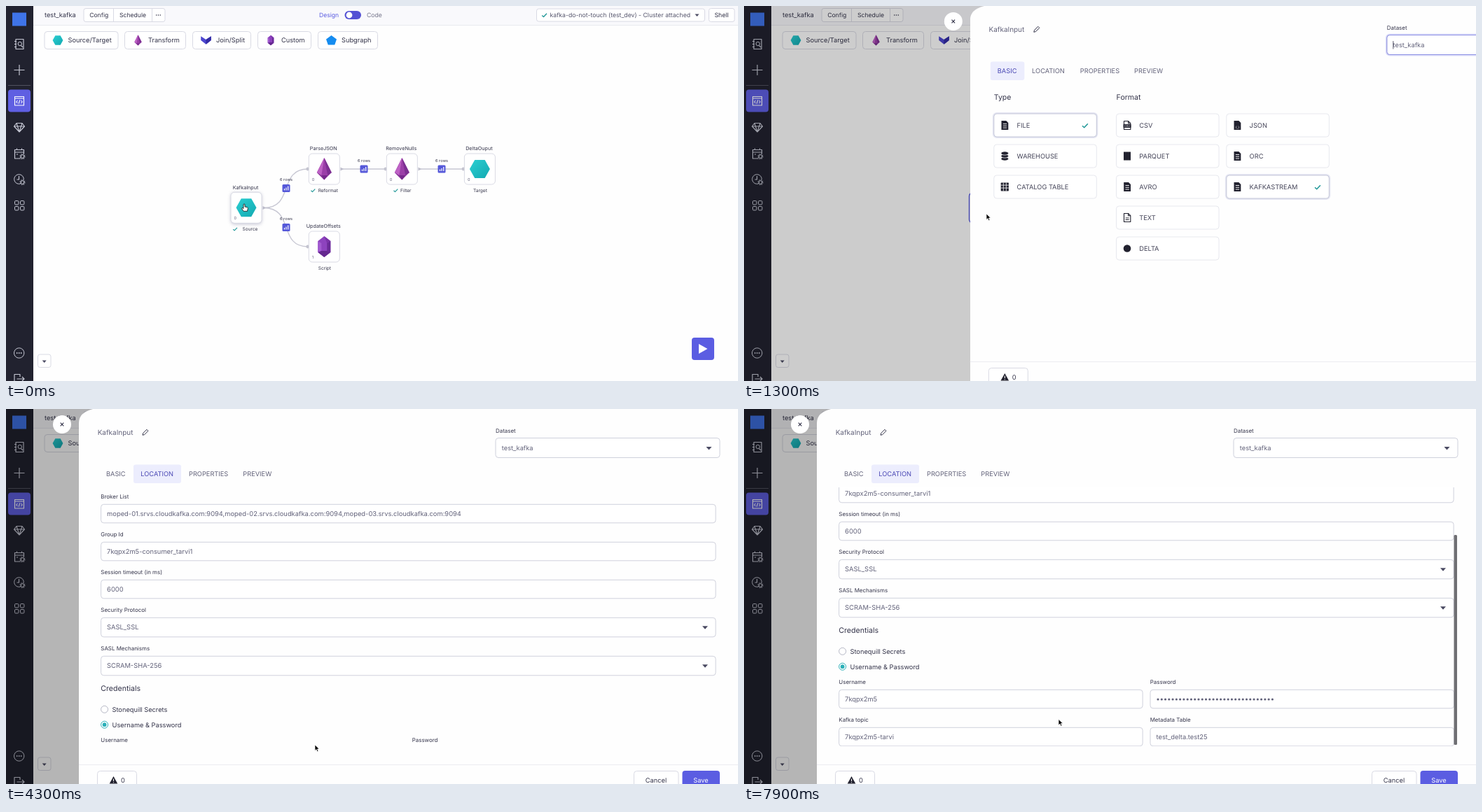
These frames come from a looping animation (1045 by 536 pixels, 8 s). An HTML page:

```html
<!DOCTYPE html>
<html lang="en">
<head>
<meta charset="utf-8">
<title>Pipeline editor</title>
<style>
  html, body { margin: 0; width: 100%; height: 100%; overflow: hidden; background: #fefefe; }
  svg { display: block; width: 100vw; height: 100vh; }
  text { font-family: Inter, "Open Sans", sans-serif; text-rendering: geometricPrecision; white-space: pre; }
</style>
</head>
<body>
<svg id="stage" viewBox="0 0 1045 536" preserveAspectRatio="none"></svg>
<script>
const INK = '#34344a', MUTED = '#62627a', LINE = '#d9dae4', ACCENT = '#5b5de2', TEAL = '#269a9a';

// Shape helpers; text is placed by its vertical centre.
const text = (x, y, s, size = 9.25, fill = INK, extra = '') =>
  `<text x="${x}" y="${y + size * 0.364}" font-size="${size}" fill="${fill}" ${extra}>${s.replace(/&/g, '&amp;')}</text>`;
const mid = (x, y, s, size, fill) => text(x, y, s, size, fill, 'text-anchor="middle"');
const box = (x, y, w, h, r = 4, fill = '#fff', stroke = LINE, extra = '') =>
  `<rect x="${x}" y="${y}" width="${w}" height="${h}" rx="${r}" fill="${fill}" stroke="${stroke}" ${extra}/>`;
const path = (d, stroke = INK, width = 1, fill = 'none') =>
  `<path d="${d}" stroke="${stroke}" stroke-width="${width}" fill="${fill}" stroke-linejoin="round"/>`;
const shape = (d, fill) => `<path d="${d}" fill="${fill}"/>`;
const dot = (x, y, r, fill, stroke = 'none') =>
  `<circle cx="${x}" cy="${y}" r="${r}" fill="${fill}" stroke="${stroke}"/>`;
const at = (x, y, body, scale = 1) => `<g transform="translate(${x} ${y}) scale(${scale})">${body}</g>`;
const group = (id, body) => `<g id="${id}">${body}</g>`;
const dots = (x, y, gap, fill, r = 0.9) => [-gap, 0, gap].map(d => dot(x + d, y, r, fill)).join('');
const check = (x, y, scale = 1) => at(x, y, path('M-3.3 .2L-1 2.4 3.5 -2.4', TEAL, 1.4), scale);
const caretDown = (x, y, s = 4) => shape(`M${x - s} ${y - s / 2}h${2 * s}l${-s} ${s * 1.15}z`, '#4a4a62');

// Component icons, drawn at node size around the origin.
const hexagon = shape('M-14.5 0L-7.2 -13H7.2L14.5 0 7.2 13H-7.2Z', 'url(#teal)');
const drop = shape('M0 -16L10.5 5 0 15.5 -10.5 5Z', '#9b3fa8')
  + shape('M0 -16L-10.5 5 -4 9Z', '#bd62c4') + shape('M0 -16L10.5 5 5 9Z', '#7c3092')
  + shape('M-10.5 5L-4 9 0 15.5Z', '#8b3a9c') + shape('M-4 9H5L0 15.5Z', '#74298a');
const crystal = shape('M0 -15L9 -8V8L0 15 -9 8V-8Z', '#8d43be')
  + shape('M0 -15L9 -8 4 -5Z', '#7a33a8') + shape('M9 -8V8L4 6V-5Z', '#6a2b98')
  + shape('M-9 -8L-4 -5V6L-9 8Z', '#a25bd0') + shape('M-9 8L-4 6H4L9 8 0 15Z', '#65288f');
const chevron = shape('M-14 -11L0 -2 14 -11V0L0 11 -14 0Z', '#4c46cf') + shape('M0 -2L14 -11V0L0 11Z', '#322ba4');
const pentagon = shape('M0 -14L15 -3 9.5 13H-9.5L-15 -3Z', '#158cf0');

// Sidebar
const PALE = '#c6c8d4';
const thin = d => path(d, PALE, 1.15);
const gear = (x, y) => dot(x, y, 3.9, '#21222f') + dot(x, y, 2.3, 'none', PALE)
  + `<circle cx="${x}" cy="${y}" r="3.4" fill="none" stroke="${PALE}" stroke-width="1.2" stroke-dasharray="1.3 1.37"/>`;
const sidebar = box(0, 0, 39, 536, 0, '#21222f', 'none')
  + box(9, 9.5, 20, 19, 0, '#3f74e8', 'none')
  + thin('M14 47.5H25V61.5H14ZM12 50.5H15M12 54.5H15M12 58.5H15M21.5 56.5L24 59') + dot(19.8, 54, 2.7, 'none', PALE)
  + thin('M11.5 91.5H26.5M19 84V99')
  + path('M3 113.5H35', '#50515f')
  + box(3, 119.5, 32, 32, 4, '#5f5fe2', 'none')
  + path('M12.5 129.5H25.5V142H12.5ZM12.5 132H25.5M16.5 135L14.7 137 16.5 139M21.5 135L23.3 137 21.5 139M19.8 134.3L18.2 139.7', '#fff', 1.1)
  + thin('M15 167.5H23L26.5 172 19 180 11.5 172ZM11.5 172H26.5M15 167.5L19 180 23 167.5')
  + thin('M12.5 205.5H25.5V218H12.5ZM12.5 209H25.5M15.5 203.5V206M22.5 203.5V206M15 212H17') + gear(23.5, 215)
  + dot(18.5, 247.5, 6.8, 'none', PALE) + thin('M18.5 243V248H15.5') + gear(23.5, 252)
  + [[12.5, 278.5], [20.5, 278.5], [12.5, 286.5], [20.5, 286.5]].map(([x, y]) => box(x, y, 5.4, 5.4, 1.2, 'none', PALE)).join('')
  + dot(18.7, 496, 7.2, 'none', PALE) + dots(18.7, 496, 3, PALE)
  + thin('M20 530V526.5H12V540H20V536M15.5 533H26M23 530L26 533 23 536');

// Header and component palette
const header = box(39, 0, 1006, 27, 0, '#f9f9fc', 'none') + path('M39 27.5H1045', '#e9eaf0')
  + text(55, 13, 'test_kafka')
  + box(111, 3.5, 116, 19, 3) + path('M153.5 3.5V22.5M208.5 3.5V22.5', LINE)
  + mid(132.7, 13, 'Config', 8.65) + mid(181, 13, 'Schedule', 8.65) + dots(217.5, 13, 2.8, INK, 0.8)
  + text(447, 13, 'Design', 8.6, ACCENT) + box(483.5, 7, 23.5, 12, 6, '#5451d4', 'none') + dot(490, 13, 4.4, '#fff')
  + text(515, 13, 'Code', 8.7, '#77778c')
  + box(757.5, 4, 240, 18, 3) + check(768.5, 13.2) + text(776.5, 13, 'kafka-do-not-touch (test_dev) - Cluster attached', 8.69, '#55556c')
  + caretDown(986.5, 13, 3)
  + box(1003.5, 3.5, 36.5, 19, 3) + mid(1021.5, 13, 'Shell', 8.8);
const palette = [
  ['Source/Target', 55, 105, 74, 88.5, hexagon, 0.51], ['Transform', 169.5, 87, 188.5, 203, drop, 0.49],
  ['Join/Split', 266.5, 83, 285.5, 300, chevron, 0.52], ['Custom', 359.5, 76, 378, 393, crystal, 0.48],
  ['Subgraph', 445.5, 85, 464.5, 479, pentagon, 0.5]
].map(([name, x, w, iconX, textX, icon, k]) =>
  box(x, 36.5, w, 25, 4) + at(iconX, 49, icon, k) + text(textX, 49, name)).join('');

// Graph
const node = (x, y, name, kind, icon, count, ticked) =>
  box(x - 22, y - 22, 44, 44, 5) + at(x, y, icon) + mid(x - 1, y - 29.3, name, 7.2)
  + text(x - 17.5, y + 15, count, 5.6, MUTED)
  + mid(x + (ticked ? 5.5 : 0.5), y + 30.7, kind, 6.55)
  + (ticked ? check(x - (kind === 'Filter' ? -2 : 0) - (kind === 'Filter' ? 11 : 16), y + 30.6, 0.85) : '');
const badge = (x, y) => mid(x, y - 12.3, '6 rows', 5.6)
  + box(x - 5.5, y - 5.5, 11, 11, 1.5, '#5558d9', 'none')
  + path(`M${x - 2.5} ${y + 3}v-2.5M${x} ${y + 3}v-4M${x + 2.7} ${y + 3}v-6`, '#fff', 1.2);
const port = (x, y) => dot(x, y, 2.4, '#c3c3cf');
const outlet = (x, y) => shape(`M${x - 2} ${y - 2.6}l4.5 2.6 -4.5 2.6z`, '#bcbcca');
const graph = path('M368 288.5C412 288.5 388 233 431 233M368 288.5C412 288.5 388 344 431 344M479 233H542M590 233H653', '#c6c6d2', 1.3)
  + [[430.8, 233], [430.8, 344], [542, 233], [653, 233]].map(p => port(...p)).join('')
  + [[368.5, 288.5], [479.5, 233], [590.5, 233]].map(p => outlet(...p)).join('')
  + [[400, 260.5], [400, 316.5], [511, 233], [622, 233]].map(p => badge(...p)).join('')
  + node(454.3, 233, 'ParseJSON', 'Reformat', drop, '0', true)
  + node(565.3, 233, 'RemoveNulls', 'Filter', drop, '0', true)
  + node(676.4, 233, 'DeltaOuput', 'Target', hexagon, '0')
  + node(454.3, 344, 'UpdateOffsets', 'Script', crystal, '1');
const hoveredNode = box(321, 267, 44, 45, 5, '#8a8aa8', 'none', 'filter="url(#soft)" opacity=".5"')
  + node(343, 288.3, 'KafkaInput', 'Source', hexagon, '0', true);
const openNode = box(321.5, 266.8, 43.5, 43.5, 5, '#fff', ACCENT, 'stroke-width="1.4"')
  + mid(342.2, 259.7, 'KafkaInput', 7.2) + text(331, 280.8, 'Open', 7.2) + path('M351.5 278.5L354 280.8 351.5 283')
  + path('M322 293.5H364.5M343.5 293.5V310', '#e2e2ea') + shape('M330.5 299L336 302 330.5 305Z', INK) + dots(354, 302, 2.2, MUTED, 0.6)
  + mid(348.5, 318.7, 'Source', 6.55) + check(331, 318.6, 0.85);
const floating = box(45.5, 498, 18.5, 18.5, 3) + caretDown(54.7, 508, 3)
  + box(979, 474, 32, 32, 4, ACCENT, 'none') + shape('M989 483L1001.5 490 989 497Z', '#fff');

// Drawer
const DARK = '#22222f';
const sheet = shape('M-4.8 -6.5H2L5 -3.5V6.5H-4.8Z', DARK);
const page = sheet + path('M-2.5 -2H2.8M-2.5 .8H2.8M-2.5 3.6H2.8', '#fff', 0.9);
const outline = path('M-4.5 -6H1.5L4.8 -2.8V6H-4.5ZM1.5 -6V-2.8H4.8', DARK, 1.1);
const icons = {
  page,
  csv: outline + box(-5.5, -1.5, 11, 5, 0.5, DARK, 'none') + mid(0, 1, 'CSV', 4, '#fff'),
  json: sheet + mid(0.2, 2.5, '{;}', 4.6, '#fff'),
  text: outline + path('M-2.3 .5H2.6M-2.3 3H2.6', DARK),
  square: box(-5, -6, 10, 12, 0, DARK, 'none'),
  disc: dot(0, 0, 5.3, DARK),
  stack: [-4, 0, 4].map(y => `<ellipse cy="${y}" rx="5.3" ry="2.6" fill="${DARK}" stroke="#fff" stroke-width=".7"/>`).reverse().join(''),
  table: box(-5.6, -6, 11.2, 12, 0.8, DARK, 'none') + path('M-5.6 -2.4H5.6M-5.6 1.6H5.6M-2 -6V6M2 -6V6', '#fff', 0.8)
};
const card = (x, row, name, icon, chosen) => {
  const y = 154 + 44 * row;
  return (chosen ? box(x, y, 146.5, 33, 4, 'none', '#e6e7f3', 'stroke-width="4"') : '')
    + box(x, y, 146.5, 33, 4, '#fff', chosen ? '#c3c6d8' : '#e7e8ee')
    + at(x + 15.5, y + 16.5, icons[icon]) + text(x + 32.8, y + 16.5, name, 9.25, '#444458')
    + (chosen ? check(x + 130, y + 17, 1.15) : '');
};
const basic = box(133, 79.5, 48.5, 26.5, 3, '#ecedfd', 'none') + text(143, 92.6, 'BASIC', 9.25, '#4a48b4')
  + text(192.3, 92.6, 'LOCATION', 9.25, MUTED)
  + text(138, 130, 'Type', 10.5) + text(312.8, 130, 'Format', 10.5)
  + card(138, 0, 'FILE', 'page', true) + card(138, 1, 'WAREHOUSE', 'stack') + card(138, 2, 'CATALOG TABLE', 'table')
  + card(312.7, 0, 'CSV', 'csv') + card(312.7, 1, 'PARQUET', 'square') + card(312.7, 2, 'AVRO', 'page')
  + card(312.7, 3, 'TEXT', 'text') + card(312.7, 4, 'DELTA', 'disc')
  + card(470, 0, 'JSON', 'json') + card(470, 1, 'ORC', 'page') + card(470, 2, 'KAFKASTREAM', 'page', true);

const field = (x, y, w, label, value, select) =>
  text(x, y, label, 7.95) + box(x + 0.3, y + 10.8, w, select ? 27.5 : 26.5, 4, '#fff', '#cfd1dc')
  + text(x + 8.8, y + 24.2, value, 9.37, MUTED) + (select ? caretDown(998, y + 24.7) : '');
const radio = (y, label, on) => dot(140.6, y, 5, '#fff', on ? '#2bb0b8' : '#b4b6c4')
  + (on ? dot(140.6, y, 2.9, '#2bb0b8') : '') + text(151.5, y, label);
const form = field(135.3, 125.5, 877.5, 'Broker List', [1, 2, 3].map(i => `moped-0${i}.srvs.cloudkafka.com:9094`).join(','))
  + field(135.3, 179.5, 877.5, 'Group Id', '7kqpx2m5-consumer_tarvi1')
  + field(135.3, 233.5, 877.5, 'Session timeout (in ms)', '6000')
  + field(135.3, 287.5, 877.5, 'Security Protocol', 'SASL_SSL', true)
  + field(135.3, 342.5, 877.5, 'SASL Mechanisms', 'SCRAM-SHA-256', true)
  + text(135.3, 399.5, 'Credentials', 10.6)
  + radio(429.3, 'Stonequill Secrets') + radio(451.2, 'Username & Password', true)
  + field(135.3, 473.5, 433.5, 'Username', '7kqpx2m5') + field(579.7, 473.5, 433.5, 'Password', '')
  + `<path d="M591 498H756" stroke="${MUTED}" stroke-width="3.2" stroke-linecap="round" stroke-dasharray="0 5.27"/>`
  + field(135.3, 527.5, 433.5, 'Kafka topic', '7kqpx2m5-tarvi') + field(579.7, 527.5, 433.5, 'Metadata Table', 'test_delta.test25');
const location_ = box(182, 79.5, 68, 26.5, 3, '#ecedfd', 'none') + text(143, 92.6, 'BASIC', 9.25, MUTED)
  + text(192.3, 92.6, 'LOCATION', 9.25, '#4a48b4')
  + `<g clip-path="url(#view)">${group('form', form)}</g>`
  + '<rect id="thumb" x="1013.5" width="4.5" height="300" rx="1.5" fill="#6f6f73"/>';

const drawer = dot(80, 22, 13, '#fff') + path('M77.7 19.7L82.3 24.3M82.3 19.7L77.7 24.3', INK, 1.2)
  + box(104, 0, 960, 570, 0, '#fefefe', 'none', 'clip-path="url(#corner)"')
  + text(130.7, 33.5, 'KafkaInput', 9.95, MUTED) + path('M195 37.3L195.7 34.5 201 29.3 203 31.3 197.7 36.6Z', INK)
  + text(699, 31, 'Dataset', 7.95)
  + group('focusRing', box(699, 41.5, 320, 28, 4, 'none', '#dcddfa', 'stroke-width="4"'))
  + box(699, 41.5, 320, 28, 4, '#fff', '#cfd1dc')
  + group('focusLine', box(699, 41.5, 320, 28, 4, 'none', '#8d90e4'))
  + text(707.8, 55.7, 'test_kafka', 9.25, MUTED) + caretDown(1003.5, 56)
  + group('caret', path('M708 50V61.5', INK, 0.8))
  + group('basic', basic) + group('location', location_)
  + text(261, 92.6, 'PROPERTIES', 9.25, MUTED) + text(338.3, 92.6, 'PREVIEW', 9.25, MUTED)
  + path('M104 508.5H1045', '#ececf1')
  + box(130.5, 517.5, 56, 28) + shape('M153.5 525L159.3 535.5H147.7Z', DARK) + path('M153.5 528.5V532M153.5 533.2V534.3', '#fff', 1.1)
  + text(164, 531, '0')
  + box(896.5, 517.5, 63.5, 28) + mid(928, 531, 'Cancel') + box(965.5, 517, 53.5, 29, 4, ACCENT, 'none') + mid(992, 531, 'Save', 9.25, '#fff');

const arrow = path('M0 0V8.4L2 6.6 3.4 9.8 4.9 9.1 3.5 6H6.2Z', '#fff', 0.7, '#000');
const hand = path('M-1 0Q0 -1.2 1 0V3.4L4.6 4.3Q5.6 4.7 5.3 6L4.5 9.8H-.8L-3.6 5.9Q-3.4 4.6 -2 5.3L-1 6Z', '#222', 0.9, '#fff');

const stage = document.getElementById('stage');
stage.innerHTML = `<defs>
  <linearGradient id="teal" x1="0" y1="0" x2="1" y2="1"><stop stop-color="#2bcfd2"/><stop offset="1" stop-color="#13a9b1"/></linearGradient>
  <filter id="soft" x="-40%" y="-40%" width="180%" height="180%"><feGaussianBlur stdDeviation="2.5"/></filter>
  <clipPath id="view"><rect x="104" y="112" width="941" height="370"/></clipPath>
  <clipPath id="corner"><path d="M124 0H1064V536H104V20Q104 5 124 0Z"/></clipPath>
</defs>` + box(0, 0, 1045, 536, 0, '#fefefe', 'none') + header + palette + graph
  + group('hovered', hoveredNode) + group('opened', openNode) + floating + sidebar
  + group('pageScroll', box(343, 531.2, 720, 4.2, 2, '#757579', 'none'))
  + '<rect id="shade" width="1045" height="536"/>' + group('drawer', drawer)
  + group('pointer', group('arrow', arrow) + group('hand', hand));

// Motion
const $ = id => document.getElementById(id);
const show = (id, on) => { $(id).style.display = on ? '' : 'none'; };
const move = (id, x, y) => $(id).setAttribute('transform', `translate(${x} ${y})`);
const ramp = (t, from, to) => Math.min(1, Math.max(0, (t - from) / (to - from)));
const ease = p => p * p * (3 - 2 * p);
const LOOP = 8000, OPENED = 1000, TAB_CLICK = 3300, SCROLL = 83;

const route = [
  [0, 340, 283.5], [400, 344, 284], [900, 345.5, 283], [1150, 345.5, 283], [1300, 346, 297], [2000, 402.5, 446],
  [2200, 403, 448], [2450, 403, 448], [3200, 216, 93], [3400, 216, 93], [4300, 441, 480],
  [4950, 441, 480], [5600, 445, 463], [5950, 445, 463], [6700, 449, 443.5], [LOOP, 449, 443.5]
];
function pointerAt(t) {
  const i = route.findIndex(p => p[0] > t);
  const [t0, x0, y0] = route[i - 1], [t1, x1, y1] = route[i];
  const p = ease(ramp(t, t0, t1));
  return [x0 + (x1 - x0) * p, y0 + (y1 - y0) * p];
}

function draw(t) {
  const selected = t >= 400, onLocation = t >= TAB_CLICK;
  show('hovered', !selected);
  show('opened', selected);
  show('pageScroll', t >= OPENED + 20 && t < 1450);
  $('shade').setAttribute('opacity', 0.29 * ramp(t, 1100, 1400));
  show('drawer', t >= OPENED);
  move('drawer', 941 * (1 - ease(ramp(t, 1020, 1429))), 0);

  for (const id of ['focusRing', 'focusLine']) show(id, !onLocation);
  show('caret', !onLocation && (t - 1200) % 1000 < 500);
  show('basic', !onLocation);
  show('location', onLocation);

  const scroll = SCROLL * ease(ramp(t, 7000, 7700));
  move('form', 0, -scroll);
  show('thumb', scroll > 0);
  $('thumb').setAttribute('y', 112 + scroll * 68 / SCROLL);

  const pointing = !selected || (t >= 3100 && t < 3500);
  show('hand', pointing);
  show('arrow', !pointing);
  move('pointer', ...pointerAt(t));
}

(function frame() {
  draw(performance.now() % LOOP);
  requestAnimationFrame(frame);
})();
</script>
</body>
</html>
```
